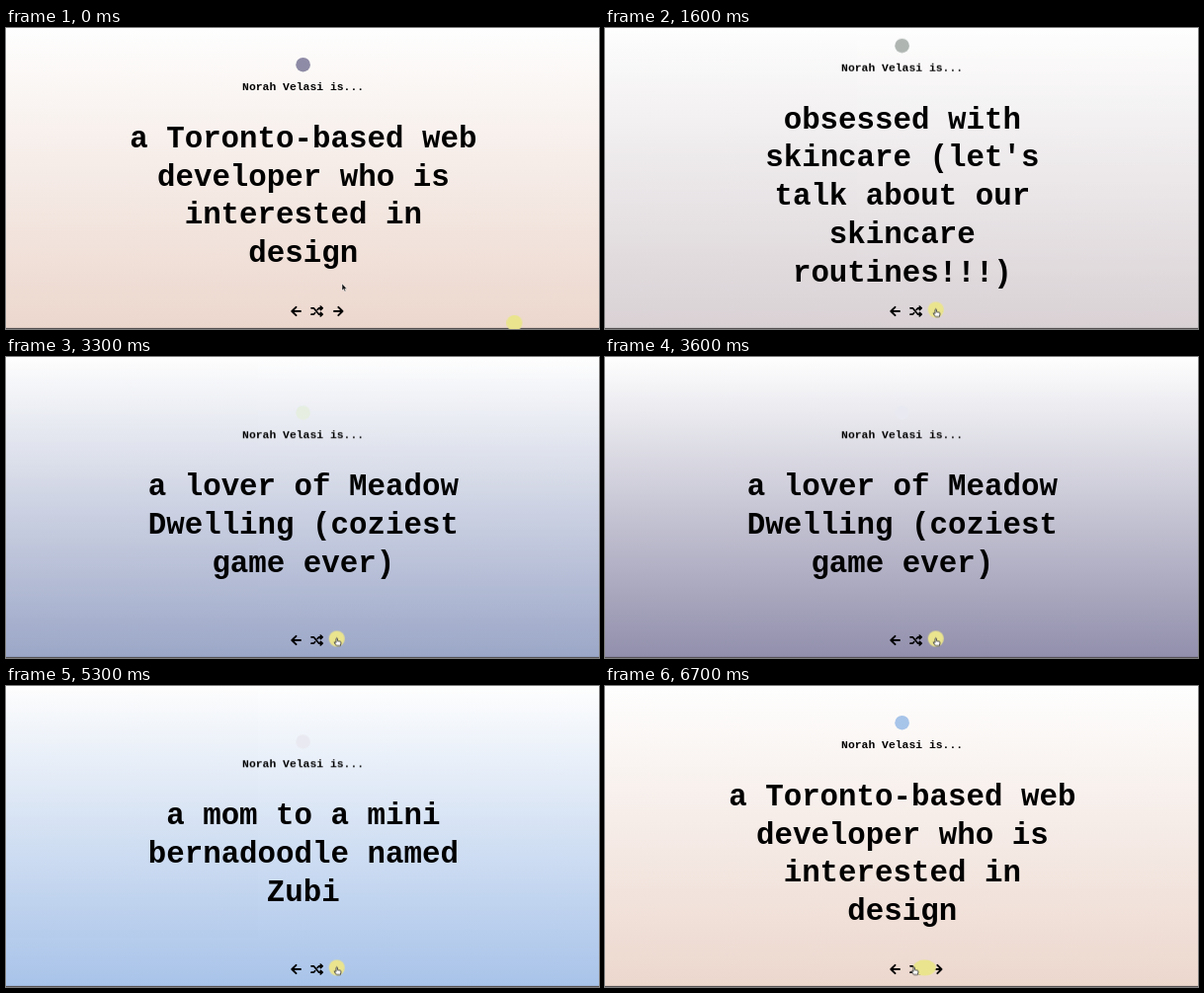
Animation of 600x305 px, one loop 6.8 s. Source, as an HTML page:

```html
<!DOCTYPE html>
<html lang="en">
<head>
<meta charset="utf-8">
<title>About me</title>
<style>
  html, body { margin: 0; width: 100%; height: 100%; overflow: hidden; background: #fff; }
  svg { display: block; width: 600px; height: 305px; }
  text {
    font-family: "Liberation Mono", "Courier New", monospace;
    font-weight: 700;
    text-anchor: middle;
  }
  .label { font-size: 11.4px; }
  .slide { font-size: 30.8px; }
  .icon { fill: none; stroke: #000; stroke-width: 1.9; stroke-linecap: round; stroke-linejoin: round; }

  /* every part shares one 6.8 s clock */
  .run { animation-duration: 6.8s; animation-iteration-count: infinite; animation-timing-function: linear; }
  .step { animation-timing-function: step-end; }

  .blue { animation-name: blue; }
  @keyframes blue {
    0%, 21.3% { opacity: 0; }
    29.4%, 91.9% { opacity: 1; }
    97.8%, 100% { opacity: 0; }
  }
  .purple { animation-name: purple; }
  @keyframes purple {
    0%, 44.1% { opacity: 0; }
    52.2%, 72% { opacity: 1; }
    78%, 100% { opacity: 0; }
  }

  .head { animation-name: head; }
  @keyframes head {
    0% { transform: translateY(0); }
    20.5% { transform: translateY(-19.3px); }
    44.1% { transform: translateY(19.3px); }
    89.7%, 100% { transform: translateY(0); }
  }
  .dot { animation-name: dot; }
  @keyframes dot {
    0%, 20.5% { fill: #8e8ba6; }
    28%, 44.1% { fill: #dff5c3; }
    51%, 89.7% { fill: #e9eaf1; }
    97.8%, 99.99% { fill: #a7c4e9; }
    100% { fill: #8e8ba6; }
  }

  .s1 { animation-name: s1; }
  .s2 { animation-name: s2; }
  .s3 { animation-name: s3; }
  .s4 { animation-name: s4; }
  @keyframes s1 { 0%, 89.7%, 100% { opacity: 1; } 20.5% { opacity: 0; } }
  @keyframes s2 { 0%, 44.1%, 100% { opacity: 0; } 20.5% { opacity: 1; } }
  @keyframes s3 { 0%, 70.5%, 100% { opacity: 0; } 44.1% { opacity: 1; } }
  @keyframes s4 { 0%, 89.7%, 100% { opacity: 0; } 70.5% { opacity: 1; } }

  .halo { animation-name: halo; }
  @keyframes halo {
    0% { transform: translate(515px, 299px); animation-timing-function: ease-out; }
    7.5% { transform: translate(341px, 266px); }
    14%, 95% { transform: translate(334.7px, 285.5px); }
    98.5%, 100% { transform: translate(323.3px, 285.5px) scale(1.45, 1); }
  }
  .pointer { animation-name: pointer; }
  @keyframes pointer {
    0%, 2% { transform: translate(340px, 259px); }
    12%, 94% { transform: translate(334px, 284.5px); }
    98.5%, 100% { transform: translate(312px, 284.5px); }
  }
  .arrow { animation-name: arrow; }
  .hand { animation-name: hand; }
  @keyframes arrow { 0% { opacity: 1; } 11%, 100% { opacity: 0; } }
  @keyframes hand { 0% { opacity: 0; } 11%, 100% { opacity: 1; } }
</style>
</head>
<body>
<svg viewBox="0 0 600 305">
  <defs>
    <linearGradient id="pinkFade" x2="0" y2="1">
      <stop stop-color="#fefefe"/><stop offset="1" stop-color="#ecd7cd"/>
    </linearGradient>
    <linearGradient id="blueFade" x2="0" y2="1">
      <stop stop-color="#fefefe"/><stop offset="1" stop-color="#a8c3e9"/>
    </linearGradient>
    <linearGradient id="purpleFade" x2="0" y2="1">
      <stop stop-color="#fefefe"/><stop offset="1" stop-color="#918fac"/>
    </linearGradient>
  </defs>

  <rect width="600" height="305" fill="url(#pinkFade)"/>
  <rect class="run blue" width="600" height="305" fill="url(#blueFade)"/>
  <rect class="run purple" width="600" height="305" fill="url(#purpleFade)"/>

  <g class="run step head">
    <circle class="run dot" cx="300.6" cy="37.2" r="7.3"/>
    <text class="label" x="300.6" y="63.2">Norah Velasi is...</text>
  </g>

  <g class="slide run step s1">
    <text x="300.8" y="121">a Toronto-based web</text>
    <text x="300.8" y="159.7">developer who is</text>
    <text x="300.8" y="198.4">interested in</text>
    <text x="300.8" y="237.1">design</text>
  </g>
  <g class="slide run step s2">
    <text x="300.8" y="101.7">obsessed with</text>
    <text x="300.8" y="140.4">skincare (let's</text>
    <text x="300.8" y="179.1">talk about our</text>
    <text x="300.8" y="217.8">skincare</text>
    <text x="300.8" y="256.5">routines!!!)</text>
  </g>
  <g class="slide run step s3">
    <text x="300.8" y="140.4">a lover of Meadow</text>
    <text x="300.8" y="179.1">Dwelling (coziest</text>
    <text x="300.8" y="217.8">game ever)</text>
  </g>
  <g class="slide run step s4">
    <text x="300.8" y="140.4">a mom to a mini</text>
    <text x="300.8" y="179.1">bernadoodle named</text>
    <text x="300.8" y="217.8">Zubi</text>
  </g>

  <g class="icon">
    <path d="M298 287H289.5M293.5 282.8L289.3 287L293.5 291.2"/>
    <path d="M332 287H340.3M336.3 282.8L340.5 287L336.3 291.2"/>
    <path stroke-width="1.7" d="M309 283.8H311.3L316.7 290.2H319.8M309 290.2H311.3L312.6 288.7M315.2 285.4L316.7 283.8H319.8M318.3 282.1L320.2 283.8L318.3 285.5M318.3 288.5L320.2 290.2L318.3 291.9"/>
  </g>

  <rect y="303" width="600" height="1" opacity=".06"/>
  <rect y="304" width="600" height="1" fill="#555153"/>

  <circle class="run halo" r="8" fill="#eae48e"/>
  <g class="run pointer">
    <path class="run step arrow" d="M0 0V7L1.6 5.6L2.7 8L3.8 7.5L2.8 5.2H4.9Z" fill="#111" stroke="#fff" stroke-width=".5"/>
    <path class="run step hand" d="M0 .8Q.7-.3 1.4.8V3.2L4.2 3.8Q5.2 4.1 5 5.3L4.4 8H.5L-2 4.9Q-1.7 3.8-.6 4.6L0 5.1Z" fill="#fff" stroke="#222" stroke-width=".8" stroke-linejoin="round"/>
  </g>
</svg>
</body>
</html>
```
